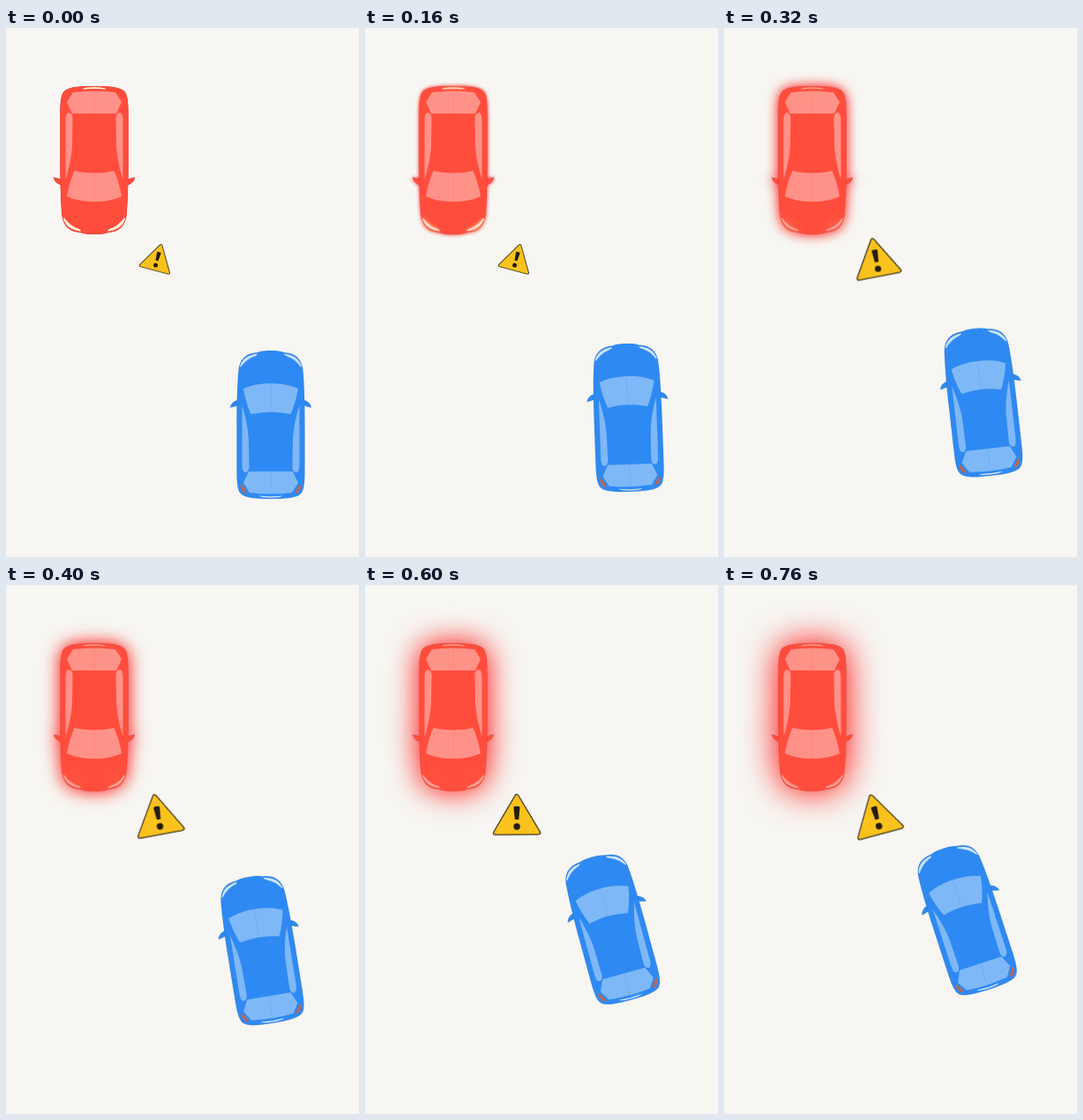
An HTML page that plays this animation: 400 px wide and 600 px high, repeating every 0.8 s.

```html
<!DOCTYPE html>
<html lang="en">
<head>
<meta charset="utf-8">
<title>Swerve warning</title>
<style>
  html, body { margin: 0; width: 100%; height: 100%; overflow: hidden; background: #f7f6f2; }
  svg { display: block; width: 400px; height: 600px; }
</style>
</head>
<body>
<svg viewBox="0 0 400 600">
  <defs>
    <filter id="glow" filterUnits="userSpaceOnUse" x="-150" y="-200" width="300" height="400" color-interpolation-filters="sRGB">
      <feDropShadow id="halo" dx="0" dy="0" stdDeviation="0" flood-color="#f00"/>
    </filter>
    <filter id="shine" filterUnits="userSpaceOnUse" x="-100" y="-150" width="200" height="300" color-interpolation-filters="sRGB">
      <feDropShadow id="lampHalo" dx="0" dy="0" stdDeviation="0" flood-color="#ffe680"/>
    </filter>
    <path id="mirror" d="M-37-28C-42-27-45-24-46-19.500C-43-20-40-21-37-22Z"/>
    <path id="sideWindow" d="M-32.500-22C-30-14-25.500 2-25 18L-24.500 48Q-25 54-29 54Q-32 54-32.500 46Z"/>
    <path id="headlight" d="M-35-66C-32-75-26-79-15.500-80.500C-15-79-17-78-20-77C-26-74.500-30-71-34-65.500Z"/>
    <path id="taillight" d="M-34.500 67C-31 69-29 73-27 78C-32 78-34.500 74-34.500 67Z"/>
    <g id="body">
      <g fill="currentColor" stroke="#000" stroke-opacity=".1" stroke-width=".8">
        <use href="#mirror"/><use href="#mirror" transform="scale(-1 1)"/>
        <path d="M0-84C7-84 11-83.500 15-82C29-81 35-74 36.500-62C38-45 38.500-20 38.500 0V50C38.500 64 38 72 35 77C31 83 18 84 0 84S-31 83-35 77C-38 72-38.500 64-38.500 50V0C-38.500-20-38-45-36.500-62C-35-74-29-81-15-82C-11-83.500-7-84 0-84Z"/>
      </g>
      <g fill="#fff" fill-opacity=".39">
        <path d="M-31-41Q-18-47 0-47T31-41Q28-24 22.500-12Q0-17-22.500-12Q-28-24-31-41Z"/>
        <use href="#sideWindow"/><use href="#sideWindow" transform="scale(-1 1)"/>
        <path d="M-25 53H25L31 66 24 77Q0 80-24 77L-31 66Z"/>
      </g>
      <path d="M0-47V-15M0 53V78" stroke="currentColor" stroke-opacity=".25" stroke-width=".7"/>
    </g>
    <g id="lamps">
      <use href="#headlight"/><use href="#headlight" transform="scale(-1 1)"/>
      <path d="M-13.500 80.500Q0 82 13.500 80.500Q11 82.700 0 82.700T-13.500 80.500Z"/>
    </g>
  </defs>

  <g transform="translate(100 150) rotate(180)" color="#ff4d3d">
    <use href="#body" filter="url(#glow)"/>
    <g id="redLamps"><use href="#lamps" fill="#fff2e6" filter="url(#shine)"/></g>
  </g>

  <g id="blueCar" color="#2e8af2">
    <use href="#body"/>
    <use href="#lamps" fill="#cfe1f7"/>
    <g fill="#b0685f"><use href="#taillight"/><use href="#taillight" transform="scale(-1 1)"/></g>
  </g>

  <g id="sign">
    <path d="M0-20.500L24.500 21H-24.500Z" fill="#3a3320" stroke="#3a3320" stroke-width="5.400" stroke-linejoin="round"/>
    <path d="M0-20.500L24.500 21H-24.500Z" fill="#fac21c" stroke="#fac21c" stroke-width="2.800" stroke-linejoin="round"/>
    <path d="M-3.500-7.500Q-3.500-9-2-9H2Q3.500-9 3.500-7.500L2.200 6H-2.200Z" fill="#231c10"/>
    <circle cy="14" r="3.700" fill="#231c10"/>
  </g>
</svg>
<script>
const LOOP = 800;
const $ = id => document.getElementById(id);
const clamp = v => Math.min(1, Math.max(0, v));
const ease = u => (1 - Math.cos(Math.PI * clamp(u))) / 2;

function draw(t) {
  const u = t / LOOP;
  const drive = 0.85 * ease(u) + 0.15 * u;

  const x = 300 - 26.2 * drive * (0.61 + 0.39 * drive);
  const y = 450 - 72 * drive;
  $('blueCar').setAttribute('transform', `translate(${x} ${y}) rotate(${-18.2 * drive})`);

  $('halo').setAttribute('stdDeviation', 20 * drive);
  $('lampHalo').setAttribute('stdDeviation', 20 * drive);
  $('redLamps').setAttribute('opacity', 1 - 0.5 * clamp(drive / 0.35));

  // The sign grows on its first swing, then rocks and settles to the left.
  const swing = k => ease((t - 200 - 160 * k) / 160);
  const angle = 15 - 30 * (swing(0) - swing(1) + swing(2));
  const scale = (2 + swing(0)) / 3;
  $('sign').setAttribute('transform', `translate(172 260) rotate(${angle}) scale(${scale})`);
}

function tick() {
  draw(performance.now() % LOOP);
  requestAnimationFrame(tick);
}
tick();
</script>
</body>
</html>
```
